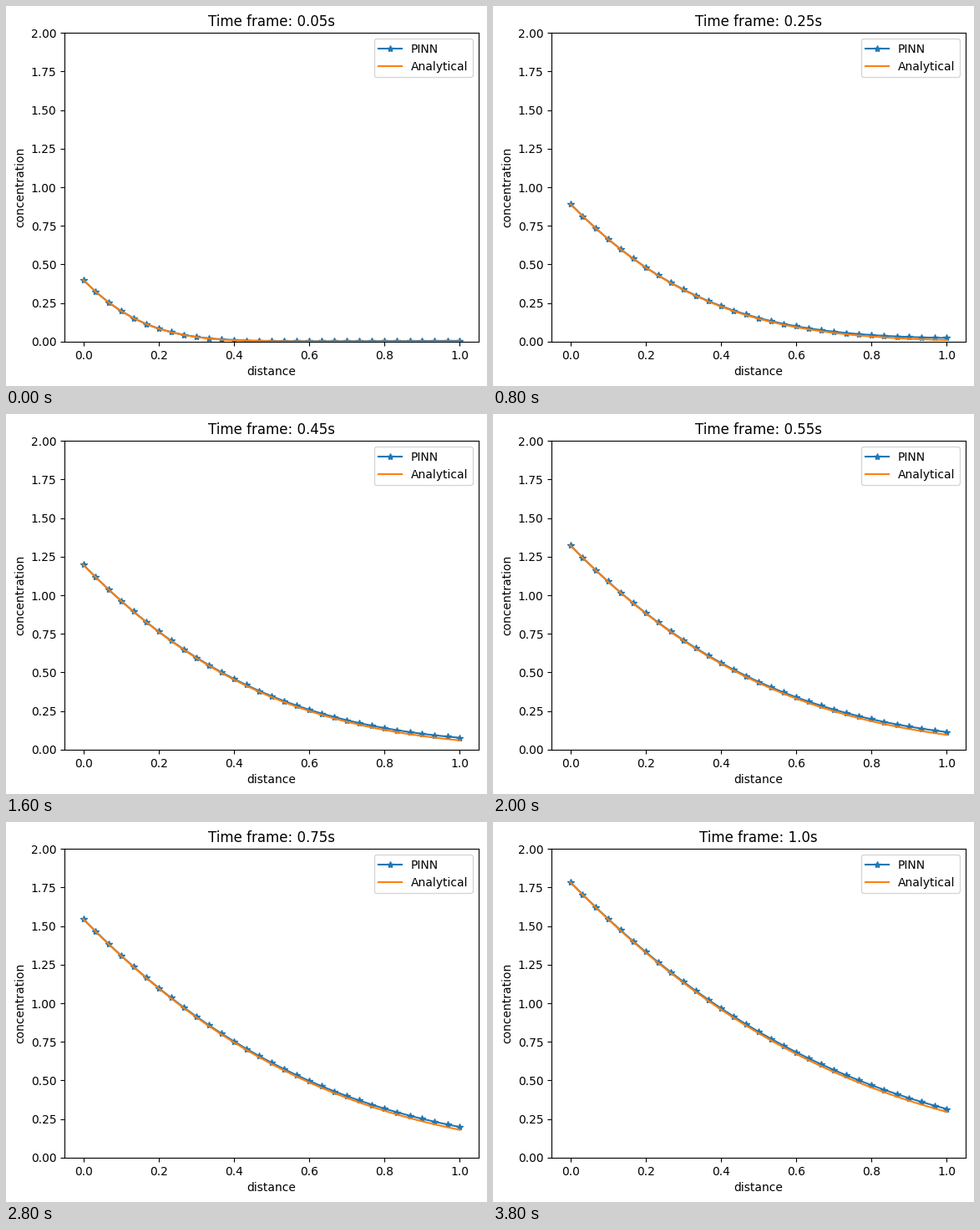
These frames come from a looping animation (576 by 455 pixels, 4 s). A matplotlib script:

```python
import math

import numpy as np
import matplotlib.pyplot as plt
from matplotlib.animation import FuncAnimation

W, H, DPI = 576, 455, 100
STEPS, DT, INTERVAL = 20, 0.05, 200
D = 0.4  # diffusion coefficient, unit inflow at x = 0

x = np.round(np.linspace(0, 1, 31), 3)
erfc = np.vectorize(math.erfc)


def analytical(x, t):
    """Diffusion into a half space with constant surface flux."""
    surface = 2 * np.sqrt(t / (math.pi * D)) * np.exp(-x**2 / (4 * D * t))
    return surface - x / D * erfc(x / (2 * np.sqrt(D * t)))


def network(x, t):
    """Analytical curve plus a small overshoot growing with x and t."""
    drift = 0.018 * (1 - math.exp(-t / 0.2))
    return analytical(x, t) + 0.001 + drift * x ** (2 - t)


fig = plt.figure(figsize=(W / DPI, H / DPI), dpi=DPI)
ax = fig.add_axes([70.03 / W, 53.17 / H, 496 / W, 369.6 / H])
pinn, = ax.plot(x, network(x, DT), "-*", color="C0", label="PINN")
exact, = ax.plot(x, analytical(x, DT), color="C1", label="Analytical")
ax.set(xlim=(-0.05, 1.05), ylim=(0, 2), xlabel="distance", ylabel="concentration")
ax.legend(loc="upper right")


def update(i):
    t = round((i + 1) * DT, 2)
    pinn.set_ydata(network(x, t))
    exact.set_ydata(analytical(x, t))
    title = ax.set_title(f"Time frame: {t}s")
    return pinn, exact, title


anim = FuncAnimation(fig, update, frames=STEPS, interval=INTERVAL,
                     repeat=True, repeat_delay=0, blit=False)
plt.show()
```
